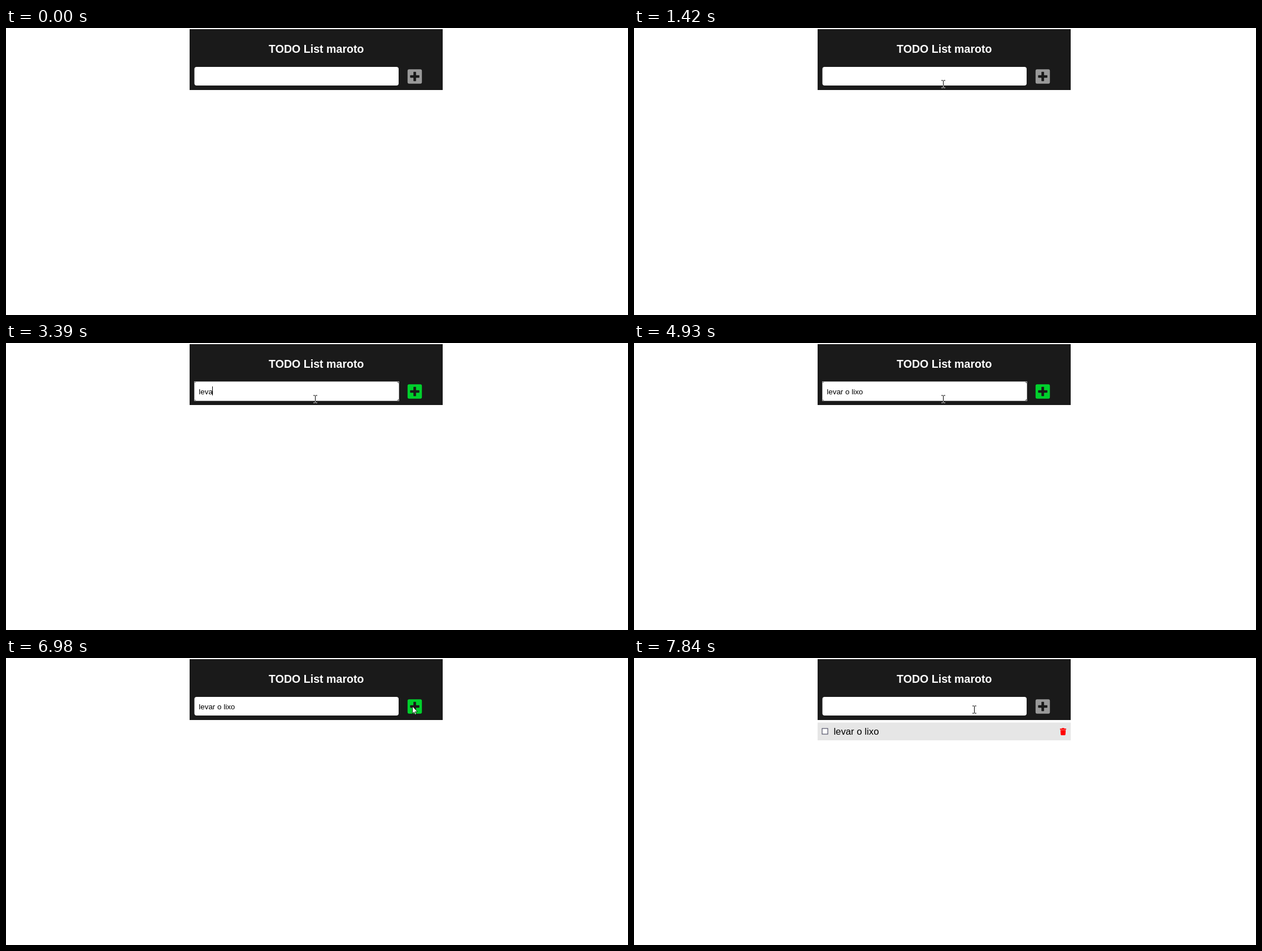
An HTML page for the animation above (8 s loop, 1101 by 509 pixels).

```html
<!DOCTYPE html>
<html lang="pt">
<head>
<meta charset="utf-8">
<title>TODO List</title>
<style>
  html, body { margin: 0; width: 100%; height: 100%; overflow: hidden; background: #fff; }
  svg { display: block; width: 1101px; height: 509px; }
  text { font-family: "Liberation Sans", Arial, sans-serif; white-space: pre; }
  #beam { mix-blend-mode: difference; }
</style>
</head>
<body>
<svg viewBox="0 0 1101 509">
  <rect width="1101" height="509" fill="#fff"/>
  <rect x="325" y="2" width="448" height="108" fill="#1a1a1a"/>
  <text x="549.3" y="44" font-size="19.6" font-weight="700" text-anchor="middle" fill="#fff">TODO List maroto</text>

  <rect x="333.5" y="69" width="361.5" height="33" rx="4" fill="#fff"/>
  <rect id="ring" x="333.5" y="68.5" width="362" height="34" fill="none" stroke="#b5b5b5"/>
  <text id="entry" x="341.3" y="91" font-size="13.4"></text>
  <rect id="caret" y="77" width="1" height="16"/>

  <rect id="add" x="710.8" y="73.3" width="25.4" height="25.4" rx="2.7"/>
  <g fill="#1a1a1a">
    <rect x="715.3" y="83.7" width="16.4" height="4.6" rx=".7"/>
    <rect x="721.2" y="77.8" width="4.6" height="16.4" rx=".7"/>
  </g>

  <g id="item">
    <rect x="325" y="114.5" width="448" height="31.5" fill="#e6e6e6"/>
    <rect x="333" y="125" width="10" height="10" fill="#fff" stroke="#33334d"/>
    <text x="353.4" y="136" font-size="16.75">levar o lixo</text>
    <path fill="#f00" d="M754 125.2h3.2l.5-.9h3.6l.5.9h3.2v1.7h-11zM754.8 127.6h9.4l-.5 8.2q-.1 1.1-1.2 1.1h-6q-1.1 0-1.2-1.1z"/>
  </g>

  <path id="arrow" fill="#fff" stroke="#000" stroke-width=".8" d="M.5.8V13.6L3.4 10.9 5.3 15.4 7.2 14.6 5.3 10.2H9.4Z"/>
  <path id="beam" fill="none" stroke="#fff" d="M-3 -6H0M1 -6H4M.5 -5.5V6.5M-3 7H0M1 7H4"/>
</svg>
<script>
const LOOP = 8000;
const $ = id => document.getElementById(id);
const ring = $("ring"), entry = $("entry"), caret = $("caret"), add = $("add"),
      item = $("item"), arrow = $("arrow"), beam = $("beam");

const pen = document.createElement("canvas").getContext("2d");
pen.font = '13.4px "Liberation Sans", Arial, sans-serif';

const PHRASE = "levar o lixo";
// Time at which each further letter appears; the first two come together.
const KEYS = [2910, 2910, 3240, 3320, 3550, 3700, 3870, 3960, 4190, 4350, 4580, 4680];
const CLEAR = 7290;

const linear = p => p;
const smooth = p => p * p * (3 - 2 * p);

// Pointer moves: the position is sampled in n steps of dt ms from t0 on.
const MOVES = [
  { t0: 300, dt: 73, n: 11, ease: smooth, to: [[1, 542, 108]] },
  { t0: 1110, dt: 80, n: 1, to: [[1, 541, 106]] },
  { t0: 1260, dt: 80, n: 3, to: [[0.34, 542, 104], [1, 547, 99]] },
  { t0: 5730, dt: 77.5, n: 11, to: [[0.2, 566, 88], [0.5, 630, 73], [0.82, 707, 83], [1, 714, 84]] },
  { t0: 6590, dt: 80, n: 2, to: [[1, 718, 84]] },
  { t0: 6980, dt: 80, n: 2, to: [[1, 719, 85]] },
  { t0: 7290, dt: 77.5, n: 5, to: [[1, 624, 91]] },
  { t0: 7680, dt: 80, n: 3, to: [[1, 602, 91]] },
];

const within = (t, a, b) => t >= a && t < b;
const show = (el, on) => el.setAttribute("visibility", on ? "visible" : "hidden");

function pointerAt(t) {
  let pos = [982, 285];
  for (const { t0, dt, n, to, ease = linear } of MOVES) {
    if (t < t0) break;
    const p = ease(Math.min(n, Math.floor((t - t0) / dt) + 1) / n);
    let [p0, x0, y0] = [0, ...pos];
    for (const [p1, x1, y1] of to) {
      const q = Math.min(1, (p - p0) / (p1 - p0));
      pos = [x0 + (x1 - x0) * q, y0 + (y1 - y0) * q];
      if (p <= p1) break;
      [p0, x0, y0] = [p1, x1, y1];
    }
  }
  return pos.map(Math.round);
}

function drawPointer(t) {
  const [x, y] = pointerAt(t);
  const overInput = x > 332 && x < 696 && y > 67 && y < 103;
  const el = overInput ? beam : arrow;
  el.setAttribute("transform", `translate(${x} ${y})`);
  show(beam, overInput);
  show(arrow, !overInput && t >= 70);
}

function render(t) {
  const typed = t < CLEAR ? PHRASE.slice(0, KEYS.filter(k => t >= k).length) : "";
  entry.textContent = typed;
  add.setAttribute("fill", typed ? "#00d02c" : "#999");
  show(ring, within(t, 1720, 6980));

  caret.setAttribute("x", Math.max(342, Math.floor(341.3 + pen.measureText(typed).width)));
  show(caret, within(t, 1720, 2200) || within(t, 2760, 4930) ||
              within(t, 5480, 5980) || within(t, 6505, 6980));

  show(item, t >= 7760);
  drawPointer(t);
}

const start = performance.now();
function tick() {
  render((performance.now() - start) % LOOP);
  requestAnimationFrame(tick);
}
tick();
</script>
</body>
</html>
```
